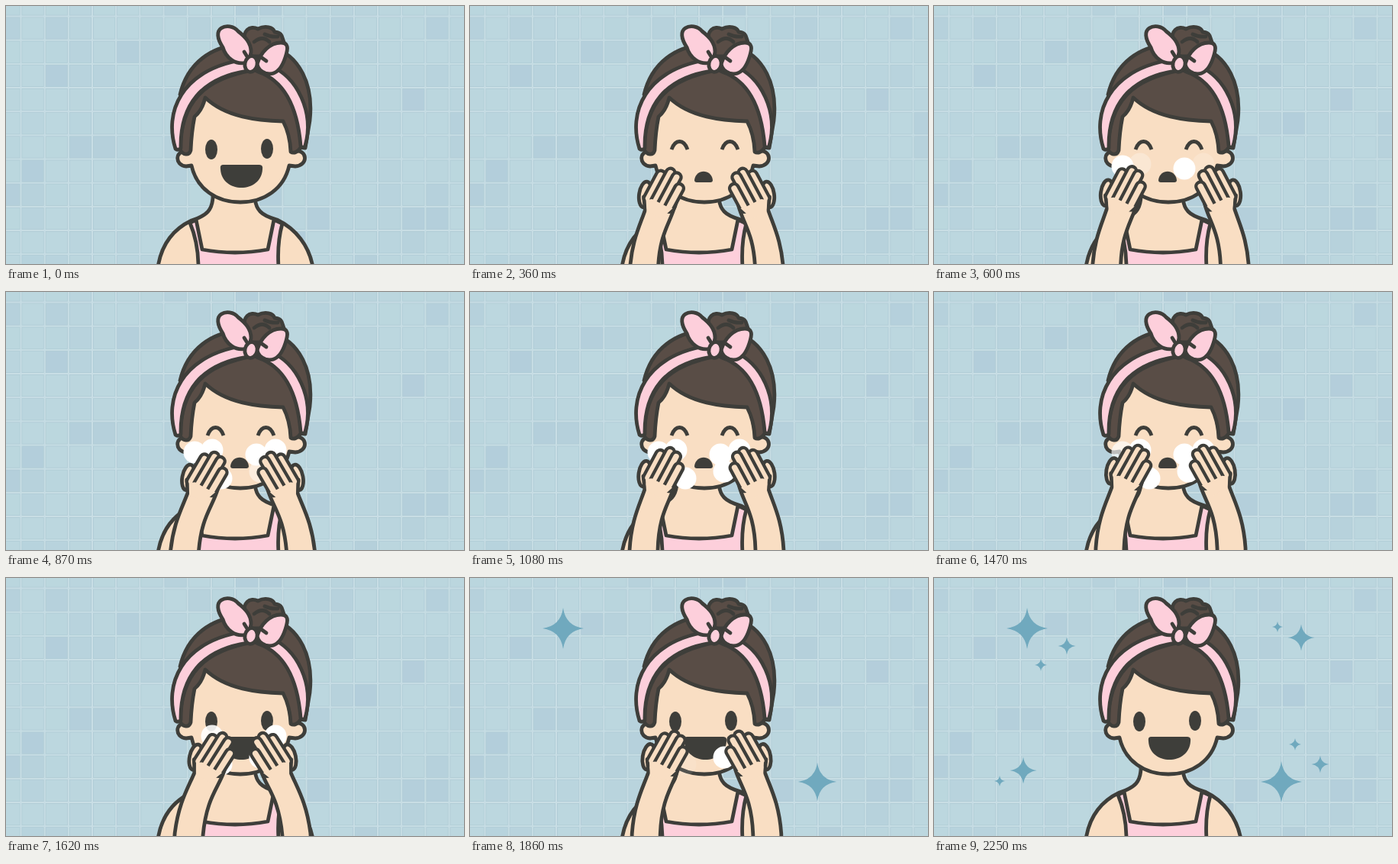
Animation, 600 px wide and 338 px high, one loop 2280 ms. Source, as an HTML page:

```html
<!DOCTYPE html>
<html lang="en">
<head>
<meta charset="utf-8">
<title>Face wash</title>
<style>
  html, body { margin: 0; width: 100%; height: 100%; overflow: hidden; background: #bcd8df; }
  svg { display: block; width: 600px; height: 338px; }
  .line { stroke: #3e3e3a; stroke-width: 4.8; stroke-linejoin: round; stroke-linecap: round; }
  .skin { fill: #f9dec3; }
  .hair { fill: #594d46; }
  .pink { fill: #fdcfdb; }
  .dark { fill: #3e3e3a; }
  .none { fill: none; }
</style>
</head>
<body>
<svg viewBox="0 0 600 338">
  <defs>
    <g id="arm">
      <ellipse class="skin line" cx="229" cy="244" rx="8" ry="17" transform="rotate(8 229 244)"/>
      <path class="skin line" d="M209 500V345C211 305 222 285 229 264L227 247L268 258C262 282 247 295 246 345V500Z"/>
      <g id="fingers" stroke-linecap="round"></g>
      <path class="skin" d="M230 251L238 250L250 256L260 261L265 262L250 276L231 266Z"/>
    </g>
  </defs>

  <g id="tiles"></g>
  <g id="stars" fill="#70a9be"></g>

  <path class="skin line" d="M199 342C204 310 222 291 243 281C262 275 272 268 271 245H326C325 268 336 275 355 280C380 292 397 314 402 342Z"/>
  <path class="pink line" d="M241 284L249 280L257 319Q300 327 343 319L351 280L362 285Q355 310 357 342H252Q252 310 241 284Z"/>

  <path class="hair line" d="M228 116C238 74 270 53 305 51L345 52C386 64 403 104 398 150L392 186L300 175Z"/>
  <path class="skin line" d="M243 120L236 191C222 188 220 209 236 210L243 209C250 240 276 257 307 257C338 257 364 240 371 209L379 210C396 209 395 189 380 190L372 120Z"/>
  <path class="hair line" d="M228 188C229 125 260 95 325 84C365 95 382 130 387 184C383 191 377 194 373 191Q372 168 363 151C330 150 288 146 261 120Q257 137 247 145Q243 165 242 189C240 196 232 196 228 188Z"/>
  <path class="pink line" d="M222 187C207 140 228 84 312 70L316 85C256 94 228 130 229 186Q226 190 222 187Z"/>
  <path class="pink line" d="M330 86C365 98 382 134 386 183Q389 188 392 183C404 140 382 92 345 78Z"/>

  <path class="hair line" d="M314 49C308 32 320 25 330 30C340 25 350 28 352 34C364 35 361 43 365 49C372 57 366 65 350 66H316Z"/>
  <path class="none line" d="M325 47Q336 38 345 47M339 37Q347 41 356 40"/>
  <path class="pink line" d="M315 74C301 78 288 68 284 54C276 42 276 33 282 29C288 25 298 26 304 33C313 40 321 48 321 60Q320 69 315 74Z"/>
  <path class="pink line" d="M329 76C334 60 346 48 360 48C370 48 370 55 366 67C360 86 350 91 340 88C334 86 330 82 329 76Z"/>
  <path class="none line" d="M312 60L317 68M334 67L341 72"/>
  <ellipse class="pink line" cx="321" cy="76" rx="8" ry="10.5" transform="rotate(12 321 76)"/>

  <g id="happy" class="dark">
    <ellipse cx="269" cy="188" rx="8" ry="13"/>
    <ellipse cx="342" cy="187" rx="8" ry="13"/>
    <path d="M284 208H332Q337 208 336 214C334 246 283 246 281 214Q280 208 284 208Z"/>
  </g>
  <g id="busy">
    <path class="none line" style="stroke-linecap: butt" d="M264 188C269 174 280 174 285 188M330 188C335 174 346 174 351 188"/>
    <path class="dark" d="M294 228Q294 231 297 231H315Q318 231 318 228C316 213 296 213 294 228Z"/>
  </g>

  <g id="foam" fill="#fff"></g>
  <g id="left"><use href="#arm"/></g>
  <g transform="matrix(-1 0 0 1 620 0)"><g id="right"><use href="#arm"/></g></g>
</svg>
<script>
const $ = id => document.getElementById(id);
const add = (parent, tag, attrs) => {
  const el = document.createElementNS('http://www.w3.org/2000/svg', tag);
  for (const k in attrs) el.setAttribute(k, attrs[k]);
  return parent.appendChild(el);
};
const clamp = v => Math.max(0, Math.min(1, v));
const ramp = (t, start, length) => clamp((t - start) / length);

// Tiled wall with slightly varied shades
const pitch = 31.17;
for (let row = -1; row < 11; row++) {
  for (let col = -1; col < 19; col++) {
    const x = 19.5 + col * pitch, y = 13.5 + row * pitch;
    const noise = Math.abs(Math.sin(col * 12.99 + row * 78.23) * 43758.5) % 1;
    const square = (inset, fill) => add($('tiles'), 'rect', {
      x: x + inset, y: y + inset, width: pitch - 2 * inset, height: pitch - 2 * inset, fill
    });
    square(0, '#c9dee5');
    square(1, '#afcbd5');
    square(1.8, `hsl(${193 + 6 * noise ** 3} 35% ${80.5 - 2.5 * noise ** 3}%)`);
  }
}

// Four parallel fingers, the second one longest
for (let i = 0; i < 4; i++) {
  const x1 = 233 + 9 * i, y1 = 249 + 4 * i, length = 43 - 5 * (i - 1.3) ** 2;
  const ends = { x1, y1, x2: x1 + length * .47, y2: y1 - length * .88 };
  add($('fingers'), 'line', { ...ends, stroke: '#3e3e3a', 'stroke-width': 16 });
  add($('fingers'), 'line', { ...ends, stroke: '#f9dec3', 'stroke-width': 7.4 });
}

// Stars in pairs, from the largest to the smallest
const stars = [
  [122, 66], [455, 267], [481, 78], [117, 252], [174, 89],
  [506, 244], [140, 114], [473, 218], [450, 64], [86, 266]
].map(([x, y], i) => {
  const rank = i >> 1;
  return {
    x, y,
    r: 7 + 20 * (1 - rank / 4) ** 2.2,
    start: 1700 + 190 * Math.sqrt(rank) + 20 * (i % 2),
    el: add($('stars'), 'path', { d: 'M0-1Q.12-.12 1 0Q.12 .12 0 1Q-.12 .12-1 0Q-.12-.12 0-1Z' })
  };
});

// Foam in left and right pairs; the last blob on the right lags behind
const foam = [
  [247, 210], [328, 213], [270, 207], [353, 207], [282, 244], [333, 235]
].map(([cx, cy], i) => {
  const rank = i >> 1, side = i % 2;
  return {
    start: 480 + 90 * rank + 10 * side * rank ** 4,
    end: 1440 + 85 * i,
    el: add($('foam'), 'circle', { cx, cy, r: 14.5 })
  };
});

function draw(t) {
  // Hands rub in circles while drifting from the cheeks to the nose
  const leave = ramp(t, 1890, 270);
  const away = (1 - ramp(t, 120, 360)) ** 3 + leave ** 2;
  const drift = ramp(t, 870, 400);
  const angle = Math.PI + (t - 660) * 2 * Math.PI / 385;
  const dx = 2 + 9 * drift + 8 * Math.cos(angle);
  const dy = -1 - 7 * drift + 2 * Math.sin(angle) + 160 * away;
  for (const id of ['left', 'right']) {
    $(id).setAttribute('transform', `translate(${dx} ${dy}) rotate(${dx * .22} 245 250)`);
    $(id).style.display = t < 150 || leave === 1 ? 'none' : '';
  }

  const busy = t >= 360 && t < 1500;
  $('busy').style.display = busy ? '' : 'none';
  $('happy').style.display = busy ? 'none' : '';

  for (const f of foam)
    f.el.setAttribute('opacity', Math.min(ramp(t, f.start, 110), 1 - ramp(t, f.end, 90)));
  for (const s of stars)
    s.el.setAttribute('transform', `translate(${s.x} ${s.y}) scale(${s.r * ramp(t, s.start, 150)})`);
}

const begin = performance.now();
function frame() {
  const t = (performance.now() - begin) % 2280;
  draw(t < 150 ? 0 : Math.floor(t / 30) * 30);
  requestAnimationFrame(frame);
}
frame();
</script>
</body>
</html>
```
